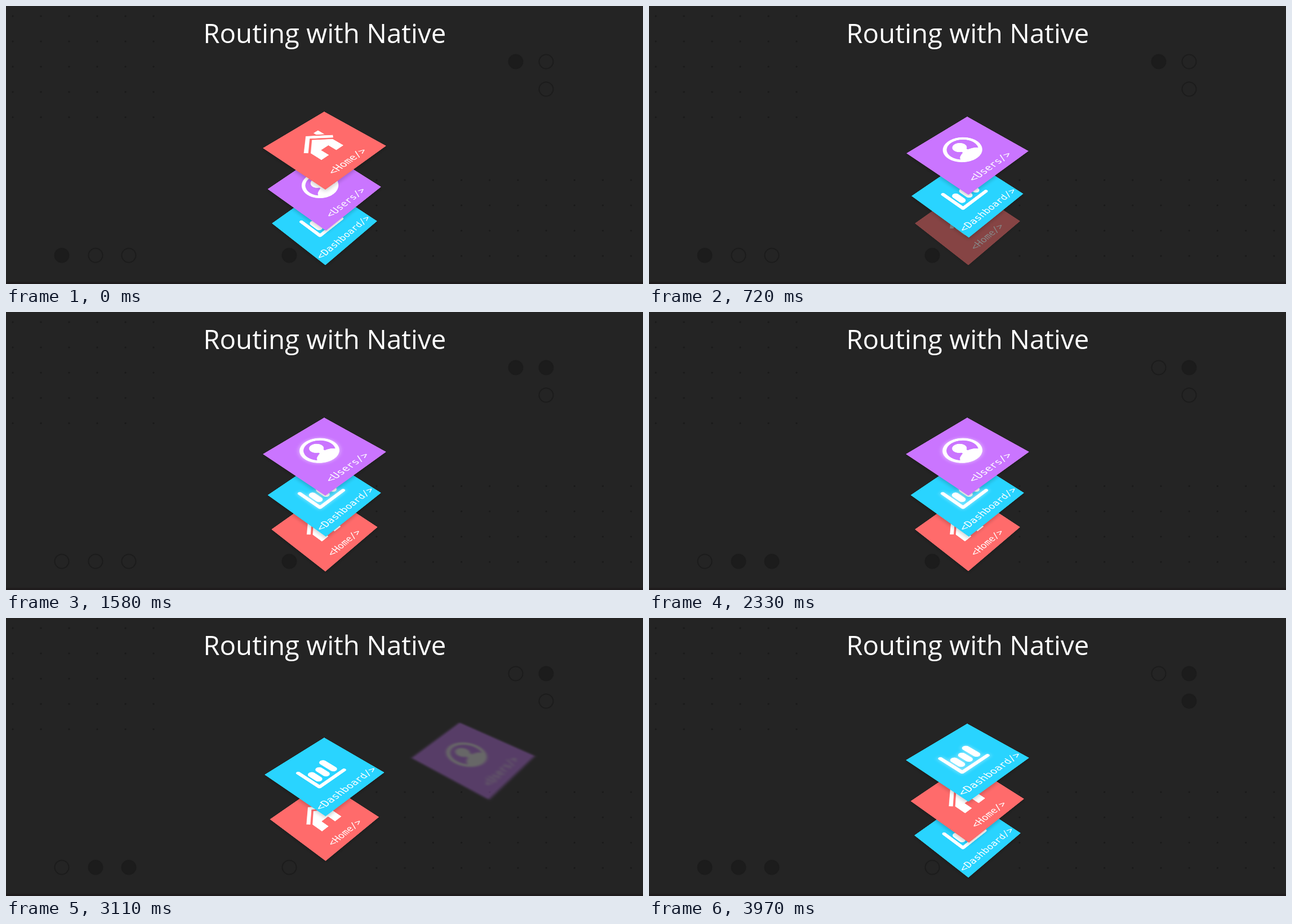
Write an HTML page that moves like this. It is 1131 px wide and 495 px high and loops after 4000 ms.

```html
<!DOCTYPE html>
<html lang="en">
<head>
<meta charset="utf-8">
<title>Routing with Native</title>
<style>
  html, body { margin: 0; width: 100%; height: 100%; overflow: hidden; background: #242424; }
  #stage { position: absolute; left: 0; top: 0; width: 1131px; height: 495px; overflow: hidden; }
  #back { position: absolute; left: 0; top: 0; }
  .title { font: 47.4px "Open Sans", sans-serif; fill: #fff; text-anchor: middle; }
  .card {
    position: absolute; left: 0; top: 0; width: 200px; height: 200px;
    transform-origin: 0 0; box-shadow: -4px 4px 10px rgba(0, 0, 0, .2);
  }
  .card svg { display: block; }
  .label { font: 26.5px "DejaVu Sans Mono", monospace; fill: #fff; text-anchor: middle; }
</style>
</head>
<body>
<div id="stage">
  <svg id="back" width="1131" height="495">
    <g id="dots" fill="#1a1a1a"></g>
    <g id="rings" stroke="#1c1c1c" stroke-width="2"></g>
    <rect y="491" width="1131" height="4" fill="#1f1c1d"/>
    <text class="title" x="565.8" y="66">Routing with Native</text>
  </svg>
</div>
<script>
const LOOP = 4000, SIZE = 200;
const STARTS = [0, 2495];

const KINDS = {
  Home: {
    color: '#ff6b6b',
    icon: `<path d="M55 85L98 46L142 86" fill="none" stroke="#fff" stroke-width="10"/>
      <path d="M119 44h15v22l-15 -13z" fill="#fff"/>
      <path d="M98 60L134 93V127H110V102H86V127H62V93Z" fill="#fff"/>`
  },
  Users: {
    color: '#ca75ff',
    icon: `<circle cx="99" cy="84" r="46" fill="#fff"/>
      <circle cx="99" cy="84" r="37" fill="#ca75ff"/>
      <circle cx="99" cy="74" r="17" fill="#fff"/>
      <path d="M91 84H107V93Q124 97 129 107Q116 124 99 124Q82 124 69 107Q74 97 91 93Z" fill="#fff"/>`
  },
  Dashboard: {
    color: '#29d4ff',
    icon: `<g fill="none" stroke="#fff" stroke-linecap="round" stroke-linejoin="round">
      <path d="M58 53V124H141" stroke-width="10"/>
      <path d="M76 80V103M101 80V103M126 68V103" stroke-width="18"/></g>`
  }
};
const ORDER = ['Home', 'Users', 'Dashboard', 'Home', 'Dashboard'];

// Corners of each place in the stack: left, top, right, bottom
const SLOTS = [
  [[456, 253], [565, 188], [675, 249], [567, 327]],
  [[464.5, 326], [565, 258], [666, 322], [568, 400]],
  [[472, 387], [565, 321], [659, 383], [567, 461.5]]
];
const BOTTOM_MID = [565.5, 386];
const SLIDE = [[1, -.014], [.91, -.007], [1, -.013], [1.1, -.013]];
const POP = [[740, 0], [860, .037], [930, .052], [990, .046], [1120, .015], [1480, .011], [1900, 0]];

const clamp = v => Math.min(1, Math.max(0, v));
const ramp = (t, from, to) => clamp((t - from) / (to - from));
const mix = (a, b, u) => a + (b - a) * u;

// cubic-bezier(.4, 0, .2, 1)
function ease(x) {
  let lo = 0, hi = 1, s = x;
  for (let i = 0; i < 18; i++) {
    s = (lo + hi) / 2;
    const at = 1.2 * s * (1 - s) ** 2 + .6 * s * s * (1 - s) + s ** 3;
    if (at < x) lo = s; else hi = s;
  }
  return s * s * (3 - 2 * s);
}

function track(points, t) {
  if (t <= points[0][0]) return points[0][1];
  for (let i = 1; i < points.length; i++) {
    const [t0, v0] = points[i - 1], [t1, v1] = points[i];
    if (t < t1) return mix(v0, v1, (t - t0) / (t1 - t0));
  }
  return points[points.length - 1][1];
}

// Perspective matrix that lays the square card onto four corners
function quad([[x0, y0], [x1, y1], [x2, y2], [x3, y3]]) {
  const ax = x1 - x2, ay = y1 - y2, bx = x3 - x2, by = y3 - y2;
  const sx = x0 - x1 + x2 - x3, sy = y0 - y1 + y2 - y3;
  const det = ax * by - bx * ay;
  const g = (sx * by - bx * sy) / det, h = (ax * sy - sx * ay) / det;
  const cols = [
    x1 - x0 + g * x1, y1 - y0 + g * y1, 0, g,
    x3 - x0 + h * x3, y3 - y0 + h * y3, 0, h
  ].map(v => (v / SIZE).toFixed(9));
  return `matrix3d(${cols},0,0,1,0,${x0},${y0},0,1)`;
}

const stage = document.getElementById('stage');
const cards = ORDER.map((name, k) => {
  const { color, icon } = KINDS[name];
  const el = document.createElement('div');
  el.className = 'card';
  el.style.background = color;
  el.style.zIndex = ORDER.length - k;
  el.innerHTML = `<svg width="${SIZE}" height="${SIZE}"><g class="icon">${icon}</g>
    <text class="label" x="100" y="181">&lt;${name}/&gt;</text></svg>`;
  stage.append(el);
  return { el, name, k, icon: el.querySelector('.icon') };
});

function grid(x0, y0, cols, rows, stepX, stepY) {
  let out = '';
  for (let r = 0; r < rows; r++)
    for (let c = 0; c < cols; c++)
      out += `<circle cx="${x0 + c * stepX}" cy="${y0 + r * stepY}" r="1.6"/>`;
  return out;
}
document.getElementById('dots').innerHTML =
  grid(12, 18, 6, 5, 50, 45) + grid(658, 310, 10, 4, 50.2, 45);

// Each ring: centre and when it is filled
const RINGS = [
  [905, 99, t => t < 1600],
  [959, 99, t => t > 750],
  [959, 148, t => t > 3300],
  [99, 444, t => t < 750 || t > 3700],
  [159, 444, t => t > 1600],
  [218, 444, t => t > 1600],
  [503, 444, t => t < 2800]
];
const rings = document.getElementById('rings');
rings.innerHTML = RINGS.map(([x, y]) => `<circle cx="${x}" cy="${y}" r="12.5"/>`).join('');

function drawCard({ el, name, k, icon }, t) {
  let slot = k, slide = 0, pop = 0, alpha = k < 3 ? 1 : 0, glow = 0;
  STARTS.forEach((start, j) => {
    const p = t - start, from = k - j;
    if (from === 0) {
      const u = ramp(p, 0, 550);
      slide = .38 * u ** 2 + .62 * u ** 7;
      alpha *= 1 - ramp(p, 350, 670) ** 2;
      glow *= 1 - ramp(p, 200, 430);
    }
    if (from > 0) {
      const delay = from === 1 ? 375 : 420;
      slot -= from > 2 ? 1 : ease(ramp(p, delay, delay + 580));
    }
    if (from === 1 || from === 2) glow = Math.max(glow * (1 - ramp(p, 200, 430)), ramp(p, 780, 1300));
    if (from === 3) {
      alpha = ramp(p, 640, 820);
      pop = track(POP, p);
    }
  });

  el.style.visibility = alpha > 0 ? 'visible' : 'hidden';
  if (alpha <= 0) return;

  slot = Math.min(2, Math.max(0, slot));
  const low = Math.min(1, Math.floor(slot)), u = slot - low;
  const shift = 264 * slide;
  const corners = SLOTS[low].map((a, i) => a.map((v, axis) => {
    const at = mix(v, SLOTS[low + 1][i][axis], u) + shift * SLIDE[i][axis];
    return at + (at - BOTTOM_MID[axis]) * pop * u;
  }));
  el.style.transform = quad(corners);
  el.style.opacity = alpha;
  el.style.filter = slide > .4 ? `blur(${(3 * slide).toFixed(2)}px)` : 'none';
  icon.style.filter = glow > 0 && name !== 'Home'
    ? `drop-shadow(0 0 6px rgba(255,255,255,${(.6 * glow).toFixed(3)}))` : 'none';
}

function draw(t) {
  cards.forEach(card => drawCard(card, t));
  RINGS.forEach(([, , filled], i) =>
    rings.children[i].setAttribute('fill', filled(t) ? '#1c1c1c' : 'none'));
}

const begin = performance.now();
function tick() {
  draw((performance.now() - begin) % LOOP);
  requestAnimationFrame(tick);
}
tick();
</script>
</body>
</html>
```
